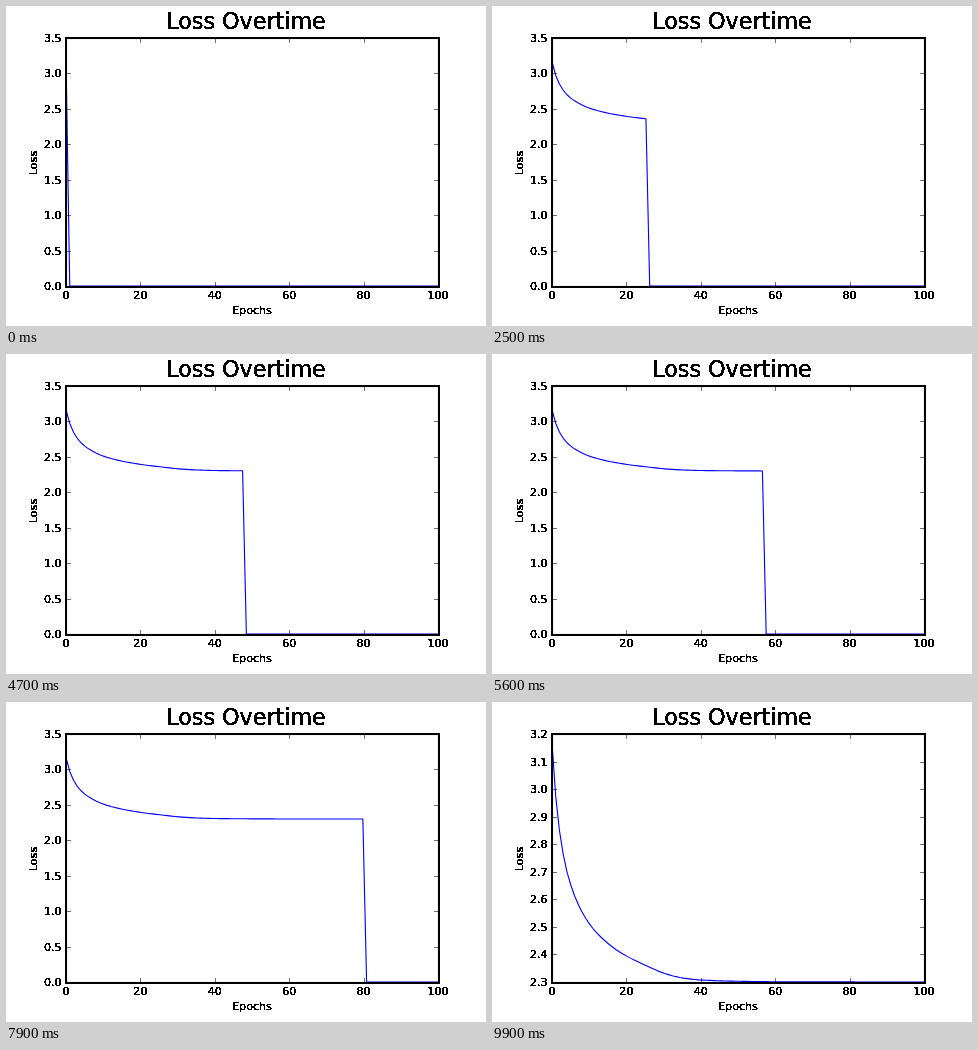
An HTML page with a canvas that plays this animation: 480x320 px, repeating every 10000 ms.

```html
<!DOCTYPE html>
<html lang="en">
<head>
<meta charset="utf-8">
<title>Loss Overtime</title>
<style>
  html, body { margin: 0; width: 100%; height: 100%; overflow: hidden; background: #fff; }
  canvas { display: block; width: 480px; height: 320px; }
</style>
</head>
<body>
<canvas id="stage" width="480" height="320"></canvas>
<script>
const W = 480, H = 320;
const LEFT = 60, RIGHT = 432, TOP = 32, BOTTOM = 280;
const EPOCHS = 100, STEP = 100;
const FONT = '"DejaVu Sans", sans-serif';
const ctx = document.getElementById('stage').getContext('2d');

// Loss at a few epochs; the rest is a smooth monotone curve.
const knots = [
  [0, 3.168], [1, 2.972], [2, 2.848], [3, 2.762], [4, 2.699], [5, 2.652],
  [6, 2.613], [8, 2.554], [10, 2.51], [12, 2.477], [16, 2.428], [20, 2.393],
  [25, 2.36], [30, 2.331], [35, 2.314], [40, 2.307], [50, 2.3025],
  [60, 2.301], [99, 2.3]
];
const slope = i => (knots[i + 1][1] - knots[i][1]) / (knots[i + 1][0] - knots[i][0]);
const tangent = i => {
  if (i === 0) return slope(0);
  if (i === knots.length - 1) return 0;
  const a = slope(i - 1), b = slope(i);
  return 2 * a * b / (a + b);
};

function lossAt(k) {
  let i = 0;
  while (i < knots.length - 2 && k > knots[i + 1][0]) i++;
  const [x0, y0] = knots[i], [x1, y1] = knots[i + 1];
  const h = x1 - x0, s = (k - x0) / h, r = 1 - s;
  return r * r * (1 + 2 * s) * y0 + s * s * (3 - 2 * s) * y1
    + h * s * r * (r * tangent(i) - s * tangent(i + 1));
}
const losses = Array.from({ length: EPOCHS }, (_, k) => lossAt(k));

const wide = { min: 0, max: 3.5, step: 0.5 };
const close = { min: 2.3, max: 3.2, step: 0.1 };

const xAt = k => LEFT + k * (RIGHT - LEFT) / (EPOCHS - 1);
const yAt = (v, scale) => BOTTOM - (v - scale.min) / (scale.max - scale.min) * (BOTTOM - TOP);

function eachTick(scale, onX, onY) {
  for (let v = 0; v <= 100; v += 20) onX(v, LEFT + v / 100 * (RIGHT - LEFT));
  const count = Math.round((scale.max - scale.min) / scale.step);
  for (let i = 0; i <= count; i++) {
    const v = scale.min + i * scale.step;
    onY(v, yAt(v, scale));
  }
}

// Lettering with hard, unsmoothed edges.
function makeLabels(scale) {
  const layer = document.createElement('canvas');
  layer.width = W;
  layer.height = H;
  const g = layer.getContext('2d', { willReadFrequently: true });
  const write = (text, x, y, align, size = 100 / 9) => {
    g.font = size + 'px ' + FONT;
    g.textAlign = align;
    g.fillText(text, x, y);
  };
  write('Loss Overtime', 240, 23, 'center', 200 / 9);
  write('Epochs', 246, 308, 'center');
  g.save();
  g.translate(31, 157);
  g.rotate(-Math.PI / 2);
  write('Loss', 0, 0, 'center');
  g.restore();
  eachTick(scale,
    (v, x) => write(String(v), x, 293, 'center'),
    (v, y) => write(v.toFixed(1), 55.6, Math.round(y) + 4, 'right'));

  const image = g.getImageData(0, 0, W, H), d = image.data;
  for (let i = 3; i < d.length; i += 4) d[i] = d[i] > 40 ? 255 : 0;
  g.putImageData(image, 0, 0);
  return layer;
}
wide.labels = makeLabels(wide);
close.labels = makeLabels(close);

function drawCurve(last, scale) {
  ctx.save();
  ctx.beginPath();
  ctx.rect(LEFT, TOP, RIGHT - LEFT, BOTTOM - TOP);
  ctx.clip();
  ctx.beginPath();
  losses.forEach((v, k) => ctx.lineTo(xAt(k), yAt(k <= last ? v : 0, scale)));
  ctx.strokeStyle = '#00f';
  ctx.lineWidth = 10 / 9;
  ctx.lineJoin = 'round';
  ctx.stroke();
  ctx.restore();
}

function drawAxes(scale) {
  ctx.fillStyle = 'rgba(0,0,0,0.555)';
  eachTick(scale,
    (v, x) => {
      const px = Math.floor(x + 0.5);
      ctx.fillRect(px, BOTTOM - 4, 1, 4);
      ctx.fillRect(px, TOP + 1, 1, 4);
    },
    (v, y) => {
      const py = Math.floor(y + 0.5);
      ctx.fillRect(LEFT + 1, py, 4, 1);
      ctx.fillRect(RIGHT - 4, py, 4, 1);
    });
  const w = RIGHT - LEFT, h = BOTTOM - TOP;
  ctx.strokeStyle = 'rgba(0,0,0,0.055)';
  ctx.lineWidth = 1;
  ctx.strokeRect(LEFT + 1.5, TOP + 1.5, w - 2, h - 2);
  ctx.strokeStyle = '#000';
  ctx.lineWidth = 2;
  ctx.strokeRect(LEFT, TOP, w + 1 + 0, h + 1);
  ctx.drawImage(scale.labels, 0, 0);
}

function draw(ms) {
  const last = Math.floor(ms / STEP) % EPOCHS;
  const scale = last === EPOCHS - 1 ? close : wide;
  ctx.fillStyle = '#fff';
  ctx.fillRect(0, 0, W, H);
  drawCurve(last, scale);
  drawAxes(scale);
}

const start = performance.now();
function tick() {
  draw(performance.now() - start);
  requestAnimationFrame(tick);
}
tick();
</script>
</body>
</html>
```
